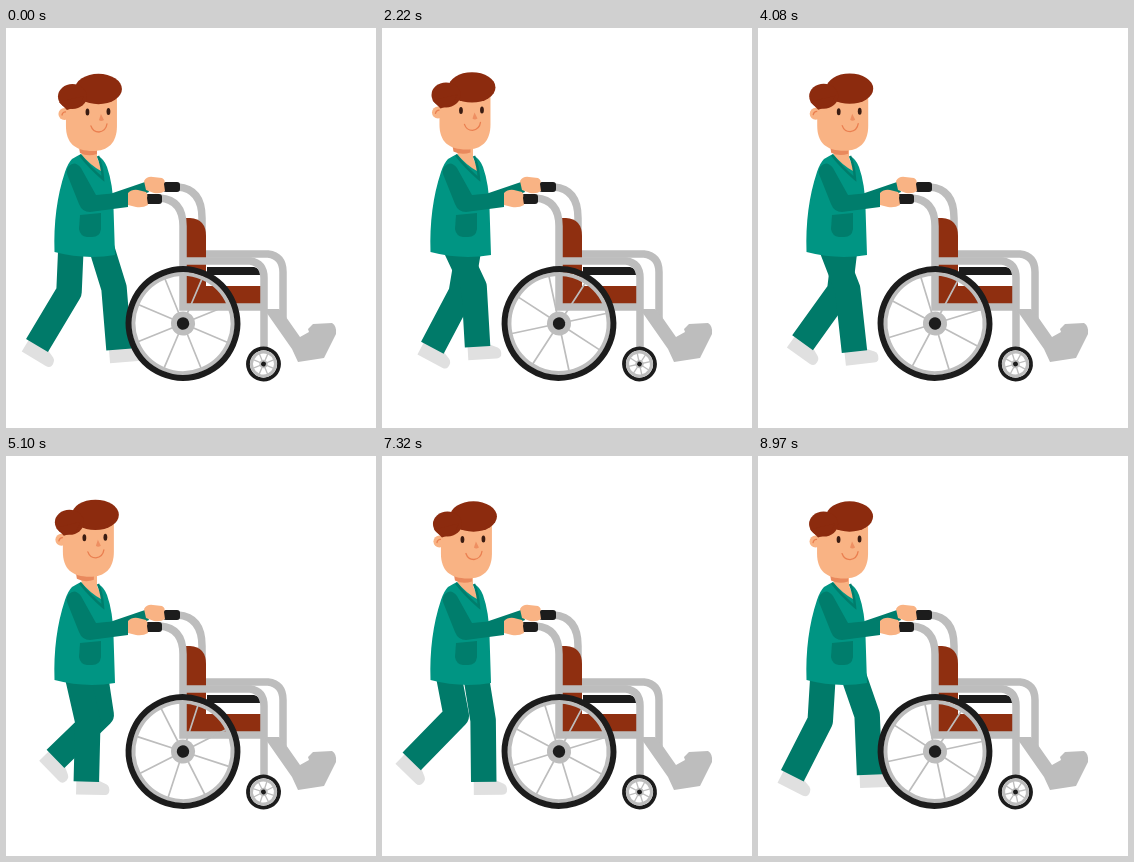
Animation, 370 px wide and 400 px high, one loop 9 s. Source, as an HTML page:

```html
<!DOCTYPE html>
<html lang="en">
<head>
<meta charset="utf-8">
<title>Nurse pushing a wheelchair</title>
<style>
  html, body { margin: 0; width: 100%; height: 100%; overflow: hidden; background: #fff; }
  svg { display: block; width: 370px; height: 400px; }
  .skin { fill: #f9b384; }
  .dark { fill: #007d6c; }
  .hair { fill: #8c2b0e; }
  .seat { fill: #8f2f10; }
  .black { fill: #1c1c1c; }
  .grey { fill: #bdbdbd; }
  .pants { fill: none; stroke: #007a69; stroke-width: 25.5; stroke-linejoin: round; }
  .shoe { fill: #e0e0e0; }
  .tube { fill: none; stroke: #bdbdbd; stroke-width: 7.5; }
  .line { fill: none; stroke: #ea7f50; stroke-width: 1.3; stroke-linecap: round; }
</style>
</head>
<body>
<svg viewBox="0 0 370 400">
  <!-- far arm -->
  <path class="dark" d="M98 168L139 154L143 164L104 180Z"/>

  <g id="legR"><path class="shoe"/><path class="pants"/></g>
  <g id="legL"><path class="shoe"/><path class="pants"/></g>

  <!-- neck and shirt -->
  <path class="skin" d="M75 118H91V130L98 146L76 131Z"/>
  <path fill="#009583" d="M66 131Q71 128 75 126Q84 137 95 143Q95 134 92 128Q98 131 101 139Q107 156 107.500 180L109 227Q79 232 48.500 224Q47 180 59 144Q62 135 66 131Z"/>
  <path d="M74 127Q84 140 97 151Q96 137 92 128" fill="none" stroke="#007d6c" stroke-width="2.5"/>
  <path class="dark" d="M74 187L95 185V201Q94 209 86 209H81Q74 208 73 201Z"/>
  <path class="dark" d="M63 138Q69 132 75 140L90 167L122 164V179L84 184Q76 184 73 176L61 146Q60 141 63 138Z"/>

  <g id="head">
    <path fill="#e9895d" d="M73 119H91V126Q82 129 74 125Z"/>
    <circle class="skin" cx="58.5" cy="86" r="6"/>
    <path class="line" d="M56 87Q57 83 61 84"/>
    <path class="skin" d="M60 62H111V98C111 115 102 123 87 123C69 123 60 115 60 98Z"/>
    <ellipse class="hair" cx="92.5" cy="61" rx="23.5" ry="15.2"/>
    <ellipse class="hair" cx="66.500" cy="68.500" rx="14.5" ry="12.5"/>
    <path class="hair" d="M53 74L61 82L73 78L78 68Z"/>
    <ellipse cx="81.5" cy="84" rx="1.9" ry="3.5" fill="#3a1c12"/>
    <ellipse cx="102.5" cy="83.5" rx="1.9" ry="3.5" fill="#3a1c12"/>
    <path d="M95 86L98 92Q95 94 93 92Z" fill="#ee8f62"/>
    <path class="line" d="M85 98Q87 104 93 104Q100 103 101 96"/>
  </g>

  <!-- chair -->
  <path class="tube" d="M172 159Q196 161 196 190V226H262Q277 228 277 244V290"/>
  <path class="seat" d="M180 190H184Q200 191 200 208V277H180Z"/>
  <path class="seat" d="M190 258H255V277H190Z"/>
  <path class="black" d="M201 239H248Q254 240 254 247H201Z"/>
  <path class="tube" d="M154 170Q177 172 177 198V279H258M177 233H244Q258 235 258 250V324"/>
  <path class="grey" d="M258 281H273L280 289L294 309L303 304L302 301L307 296L326 295Q331 298 330 306L318 330L292 334L286 321Z"/>
  <rect class="black" x="157" y="154" width="17" height="10" rx="3"/>
  <rect class="black" x="139" y="166" width="17" height="10" rx="3"/>
  <path class="skin" d="M138 153Q141 148 147 149L156 150Q160 152 158 156L159 163Q155 166 148 165L140 162Z"/>
  <path class="skin" d="M122 165Q126 161 132 162L140 164Q142 166 141 170L142 177Q137 180 130 179L122 177Z"/>

  <g id="big" fill="none">
    <circle r="49.5" stroke="#bdbdbd" stroke-width="4"/>
    <circle r="54.3" stroke="#1c1c1c" stroke-width="6"/>
    <path stroke="#bdbdbd" stroke-width="1.7"/>
    <circle r="12" class="grey"/>
    <circle r="6.2" class="black"/>
  </g>
  <g id="small" fill="none">
    <circle r="15.5" fill="#fff" stroke="#1c1c1c" stroke-width="3.8"/>
    <circle r="12" stroke="#bdbdbd" stroke-width="3"/>
    <path stroke="#bdbdbd" stroke-width="1.3"/>
    <circle r="4.2" class="grey"/>
    <circle r="2.4" class="black"/>
  </g>
</svg>
<script>
const $ = id => document.getElementById(id);
const { sin, cos, PI } = Math;
const LOOP = 9000, STEP = 30, STRIDE = 900, SWAY = 3150, TURN = 2160;

// Joints swing as sums of two waves; phase 0 has the leg stretched back
function drawLeg(id, phase, hipX, kneeX, ankleX) {
  const a = 2 * PI * phase, c = cos(a), s = sin(a), c2 = cos(2 * a), s2 = sin(2 * a);
  const hx = hipX - 4 * c;
  const kx = kneeX - 14 * c + 6 * s - 2 * c2;
  const ky = 262 + 2 * c - 5 * s;
  const ax = ankleX - 33 * c - 8 * s + 3 * c2 - 3 * s2;
  const ay = 316 - 2 * c - 12 * s + 3.5 * c2;
  const tilt = Math.atan2(kx - ax, ay - ky) * 180 / PI;
  const [shoe, pants] = $(id).children;
  shoe.setAttribute('transform', `translate(${ax} ${ay}) rotate(${tilt})`);
  pants.setAttribute('d', `M${hx} 218L${kx} ${ky}L${ax} ${ay}`);
}

function addSpokes(id, r) {
  let d = '';
  for (let a = 0; a < 2 * PI - 0.01; a += PI / 4) d += `M0 0L${r * cos(a)} ${r * sin(a)}`;
  $(id).querySelector('path').setAttribute('d', d);
}

function draw(t) {
  const phase = t / STRIDE;
  drawLeg('legL', phase, 69, 79, 61);
  drawLeg('legR', phase + 0.5, 91, 96, 77);

  const sway = (1 - cos(2 * PI * (t / SWAY - 0.08))) / 2;
  $('head').setAttribute('transform', `translate(${-3.2 * sway ** 1.5} ${-2.2 * sway ** 2})`);

  const turn = 23 + 360 * t / TURN;
  $('big').setAttribute('transform', `translate(177 295.5) rotate(${turn})`);
  $('small').setAttribute('transform', `translate(257.5 336) rotate(${turn})`);
}

addSpokes('big', 48);
addSpokes('small', 11);
for (const shoe of document.querySelectorAll('.shoe')) {
  shoe.setAttribute('d', 'M-10 -2H11L20 2Q24 4 23 10Q22 13 18 13H-10Z');
}

const start = performance.now();
function tick() {
  const t = Math.max(0, performance.now() - start) % LOOP;
  draw(Math.floor(t / STEP) * STEP);
  requestAnimationFrame(tick);
}
tick();
</script>
</body>
</html>
```
